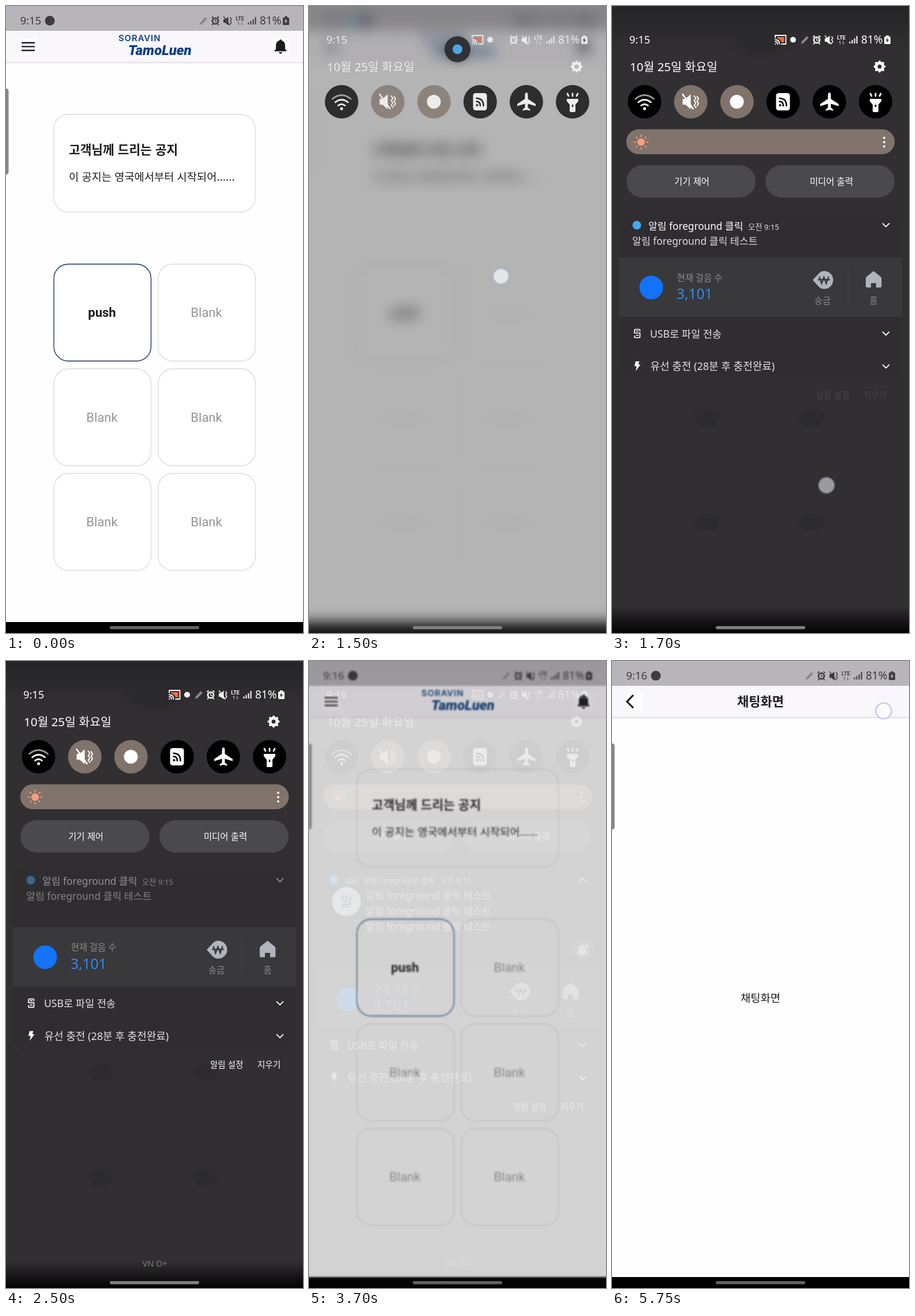
An HTML page that plays this animation: 515 px wide and 1087 px high, repeating every 5800 ms.

```html
<!DOCTYPE html>
<html lang="ko">
<head>
<meta charset="utf-8">
<title>Push notification demo</title>
<style>
html, body { margin: 0; height: 100%; overflow: hidden; background: #000; }
svg { display: block; width: 100vw; height: 100vh; }
text { font-family: "Noto Sans", "Noto Sans CJK KR", sans-serif; }
.kr { font-family: "Noto Sans CJK KR", "Noto Sans CJK", sans-serif; }
.rb { font-family: Roboto, sans-serif; }
.b { font-weight: 700; }
.mid { text-anchor: middle; }
.line { fill: none; stroke: currentColor; stroke-linecap: round; stroke-linejoin: round; }
.faint { opacity: var(--faint, 1); }
#bubble { filter: drop-shadow(0 2px 7px rgba(0,0,0,.28)); }
</style>
</head>
<body>
<svg viewBox="0 0 515 1087" preserveAspectRatio="none">
<defs>
  <g id="status">
    <path class="faint" d="M335.5 33l1.6-4.6 8.6-9.2 3.2 3.1-8.8 9z" fill="#89878b"/>
    <g class="line" stroke-width="2.6"><circle cx="363" cy="26" r="5"/><path d="M357 20.5l2-1.8M369 20.5l-2-1.8M358.7 31.5l-1 1.2M367.3 31.5l1 1.2" stroke-width="1.8"/><path d="M363 23.5v3h2" stroke-width="1.3"/></g>
    <path d="M377 23h3l5.5-4.5v15L380 29h-3z" fill="currentColor"/>
    <path d="M377.5 18.5L388 33M389 20l1.8 2.6-1.8 3 1.8 3-1.8 2.6" class="line" stroke-width="1.5"/>
    <text class="rb b" x="398.3" y="25" font-size="9" fill="currentColor">LTE</text>
    <path d="M403.5 33v-5.5l-2 2M408.5 27.5V33l2-2" class="line" stroke-width="1" opacity=".65"/>
    <path d="M419.5 28.5h2V32h-2zM423.5 26h2v6h-2zM427.6 23h2v9h-2zM431.6 19h2v13h-2z" fill="currentColor"/>
    <text x="440" y="32.3" font-size="19" fill="currentColor">81%</text>
    <path d="M483 18h5v2h1.5q1.5 0 1.5 1.5v10q0 1.5-1.5 1.5h-8q-1.5 0-1.5-1.5v-10q0-1.5 1.5-1.5H483z" fill="currentColor"/>
  </g>
  <g id="side">
    <rect x="-80" y="-80" width="675" height="123" fill="#b7b5ba"/>
    <rect x="-80" y="43" width="675" height="55" fill="#f9f7fb"/>
    <rect y="97.5" width="515" height="1.2" fill="#d2d0d5"/>
    <use href="#status" color="#3d3c40"/>
    <path d="M486 21.5l-3.5 5.5h2.4l-.7 4 4-5.6h-2.6z" fill="#b7b5ba"/>
    <path class="faint" d="M0 143q4.5 0 4.5 5v139q0 5-4.5 5z" fill="#858487"/>
    <rect x="-80" y="1068" width="675" height="100"/>
  </g>
  <linearGradient id="floor" x1="0" x2="0" y1="0" y2="1"><stop offset="0" stop-color="#000" stop-opacity="0"/><stop offset="1" stop-color="#000" stop-opacity=".95"/></linearGradient>
  <linearGradient id="roof" x1="0" x2="0" y1="0" y2="1"><stop offset="0" stop-color="#262527"/><stop offset=".35" stop-color="#28272a"/><stop offset="1" stop-color="#312f31"/></linearGradient>
  <radialGradient id="shadow"><stop offset=".4" stop-color="#2a292b"/><stop offset="1" stop-color="#2a292b" stop-opacity="0"/></radialGradient>
  <clipPath id="pillClip"><rect id="clipBox" y="58" height="46" rx="22"/></clipPath>
  <path id="bell" d="M0-12a2 2 0 0 1 2 2q6 1.5 6 8.5v6l2.5 2.7V8.500h-21V7.200L-8 4.500v-6Q-8-8.500-2-10a2 2 0 0 1 2-2zM-2.800 10h5.600a2.800 2.800 0 0 1-5.600 0z"/>
  <path id="chev" class="line" stroke-width="1.9" d="M-5.500-2.800L0 2.700 5.500-2.800"/>
</defs>

<g id="home">
  <rect x="-80" y="-80" width="675" height="1247" fill="#fefefe"/>
  <use href="#side"/>
  <text class="clock" x="24.500" y="32" font-size="18.500" fill="#3d3c40">9:15</text>
  <circle id="newIcon" cx="76.500" cy="26" r="7.500" fill="#46a9f0"/>
  <circle id="oldIcon" cx="76" cy="25.500" r="8.500" fill="#3d3c40"/>
  <rect x="24" y="56" width="30" height="29" fill="#fff"/>
  <path d="M27 63.700h23M27 70.400h23M27 77h23" stroke="#1c1b1f" stroke-width="2.400"/>
  <text x="195" y="60.500" font-size="14.800" font-weight="600" letter-spacing="1" fill="#0d3f80" style="font-family:Inter,sans-serif">SORAVIN</text>
  <text class="rb" x="212" y="84.800" font-size="24" font-weight="900" font-style="italic" fill="#0d3f80">TamoLuen</text>
  <rect x="461" y="56" width="30" height="29" fill="#fff"/>
  <use href="#bell" x="476" y="70" fill="#1c1b1f"/>
  <rect class="faint" x="82.800" y="188" width="349.500" height="169" rx="25" fill="#fff" stroke="#dbdadd" stroke-width="1.300"/>
  <text class="kr b" x="109" y="256.500" font-size="21.400" fill="#1c1b1f">고객님께 드리는 공지</text>
  <text class="kr" x="109" y="303" font-size="18.700" fill="#1c1b1f">이 공지는 영국에서부터 시작되어......</text>
  <g id="tiles"></g>
  <circle id="ripple" cx="167" cy="531" fill="#1c1b1f"/>
</g>

<rect id="dim" width="515" height="1087" fill="#312f31"/>

<g id="bubble">
  <rect id="pill" fill="#242326"/>
  <circle id="pillIcon" r="8.500" fill="#46a9f0"/>
  <g id="pillText" clip-path="url(#pillClip)" fill="#fff">
    <text x="80" y="87" font-size="16.800" font-weight="600">알림 foreground...</text>
    <text x="247" y="87" font-size="17.300">알림 foreground 클릭 테스트</text>
  </g>
</g>

<g id="shade" color="#fff">
  <g id="backdrop">
    <rect width="515" height="1087" fill="#312f31"/>
    <rect width="515" height="75" fill="url(#roof)"/>
    <ellipse cx="257" cy="62" rx="62" ry="36" fill="url(#shadow)"/>
    <g fill="#2c2b2d"><rect x="143" y="698" width="44" height="30" rx="15"/><rect x="324" y="698" width="44" height="30" rx="15"/><rect x="143" y="880" width="44" height="30" rx="15"/><rect x="324" y="880" width="44" height="30" rx="15"/></g>
    <rect y="1040" width="515" height="47" fill="url(#floor)"/>
  </g>
  <g id="top">
    <text class="clock" x="30" y="65.300" font-size="18.300" fill="#fff">9:15</text>
    <use id="shadeStatus" href="#status" x="-8" y="33"/>
    <path d="M478 54.500l-3.500 5.500h2.400l-.7 4 4-5.600h-2.600z" fill="#312f31"/>
    <g class="line" stroke-width="1.800"><path d="M283 55v-4h18.500v15H294M283 66h.5M283 62q4 0 4 4M283 58.500q7.500 0 7.500 7.500"/></g>
    <path d="M286 54h12.500v9H294q-2-6-8-7z" fill="#f06a3c"/>
    <circle cx="314" cy="58.500" r="5" fill="#fff"/>
    <text x="31" y="112.800" font-size="20.500" fill="#fff">10월 25일 화요일</text>
    <g id="gear" transform="translate(464 105)"><circle r="6" fill="none" stroke="#fff" stroke-width="5"/></g>
    <g id="quick"></g>
    <g transform="translate(56.500 166)" class="line" stroke-width="2.700"><path d="M-16-5Q0-18 16-5" opacity=".6"/><path d="M-11 1Q0-8 11 1M-6 6.500Q0 2 6 6.500"/><circle cy="12" r="1.200"/></g>
    <g transform="translate(136.500 166)"><path d="M-14-5h5L0-13v26L-9 5h-5z" fill="#fff"/><path d="M-14-13L4 12" class="line" stroke-width="2.600"/><path d="M6-10l3 4-3 4 3 4-3 4 3 4M11-9l2.500 4-2.500 4 2.500 4-2.500 4" class="line" stroke-width="2"/></g>
    <circle cx="216.500" cy="166" r="12" fill="#fff"/>
    <g transform="translate(296.500 166)"><rect x="-12" y="-15" width="24" height="30" rx="4.500" fill="#fff"/><g fill="none" stroke="#000" stroke-width="2.600" stroke-linecap="round"><path d="M-6-6Q6-6 6 7M-6-.5Q.5-.5.5 7"/><circle cx="-5" cy="6" r=".8"/></g></g>
    <path transform="translate(377 166)" d="M0-16q2.500 0 2.500 5v6L16 4v3.500L2.500 3.500V10l4 3.500v2L0 14l-6.500 1.500v-2l4-3.500V3.500L-16 7.500V4L-2.500-5v-6q0-5 2.500-5z" fill="#fff"/>
    <g transform="translate(457 166)"><path d="M-10-5h20v4L5 5v11q0 2-2 2h-6q-2 0-2-2V5l-5-6z" fill="#fff"/><path d="M0-10v-4M-7-10l-2-4M7-10l2-4" class="line" stroke-width="2.800"/><path d="M0 5v4" stroke="#000" stroke-width="2.500"/></g>
  </g>
  <g id="slider">
    <rect x="25.200" y="214.200" width="464.600" height="42.300" rx="21" fill="#80736b" stroke="#8a7e76" stroke-width=".8"/>
    <g id="sun" transform="translate(50.500 236)"><circle r="6.500" fill="#f79d7d"/></g>
    <g fill="#fff"><circle cx="472" cy="228.500" r="2"/><circle cx="472" cy="236" r="2"/><circle cx="472" cy="243.500" r="2"/></g>
  </g>
  <g id="body">
    <g fill="#4a494c"><rect x="25" y="276" width="224" height="56" rx="28"/><rect x="266" y="276" width="224" height="56" rx="28"/></g>
    <g class="mid" fill="#fff" font-size="15.400" font-weight="500"><text class="kr" x="138.500" y="310">기기 제어</text><text class="kr" x="380.500" y="310">미디어 출력</text></g>
    <rect id="card" x="12" y="356" width="491" rx="26" fill="#2f2d2f"/>
    <g id="small" fill="#fff">
      <circle cx="43" cy="380" r="7.500" fill="#46a9f0"/>
      <text x="63" y="388" font-size="17.200">알림 foreground 클릭</text>
      <text x="236" y="388" font-size="13.200" fill="#dedde0">오전 9:15</text>
      <text x="35" y="414" font-size="17.300" fill="#dedde0">알림 foreground 클릭 테스트</text>
      <use href="#chev" x="475" y="380"/>
    </g>
    <g id="large" fill="#e4e3e6">
      <circle cx="43" cy="379" r="7.500" fill="#46a9f0"/>
      <g font-size="13"><text x="62" y="384.500">app</text><text x="94" y="384.500">알림 foreground 클릭</text><text x="228" y="384.500">오전 9:15</text></g>
      <use href="#chev" transform="translate(474.500 379) scale(1 -1)"/>
      <circle cx="65" cy="417" r="25" fill="#dce1fb"/>
      <text class="kr mid" x="65" y="425" font-size="23" fill="#1c1b1f">알</text>
      <g font-size="17.300" id="lines"></g>
      <circle cx="475" cy="500" r="17.500" fill="#49484a"/>
      <use href="#bell" transform="translate(474 501) scale(.82)" fill="#dddce0"/>
      <circle cx="481" cy="495" r="4" fill="#dddce0" stroke="#49484a" stroke-width="1.500"/>
    </g>
    <g id="low">
      <rect x="12" y="436" width="491" height="103" fill="#39383a"/>
      <circle cx="68" cy="488" r="20.500" fill="#1473fb"/>
      <text x="112.500" y="476.500" font-size="15.400" fill="#8c8b8f">현재 걸음 수</text>
      <text x="112" y="508.300" font-size="24.500" fill="#318af5">3,101</text>
      <path d="M348 475l9.500-10q4-5.500 10.500-5.500a15.500 15.500 0 0 1 0 31q-6.500 0-10.500-5z" fill="#b1b4ba"/>
      <path d="M359.500 469l4 12 4-11 4 11 4-12M357 474.500h21" fill="none" stroke="#39383a" stroke-width="2.300"/>
      <path d="M409.500 456v62" stroke="#444346"/>
      <path d="M453.500 459.500l12 9.500q1.800 1.500 1.800 3.500v13q0 2.500-2.500 2.500H458v-7.500h-9v7.500h-6.500q-2.500 0-2.500-2.500v-13q0-2 1.800-3.500z" fill="#b1b4ba"/>
      <g class="mid" font-size="15.300" fill="#8c8b8f"><text class="kr" x="365" y="516">송금</text><text class="kr" x="453.500" y="516">홈</text></g>
      <path d="M39 566v-3.500q0-2 2-2h5.500q2 0 2 2v1M39 567h9.500v6q0 2-2 2H41q-2 0-2-2v-1M42 563.500h3.500M42 571h3.500" class="line" stroke-width="1.700"/>
      <text x="66" y="574.800" font-size="17.600" fill="#e4e3e6">USB로 파일 전송</text>
      <use href="#chev" x="475" y="568"/>
      <path d="M41 616h6.500l-2 5.500h4L41 633l1.800-8.500h-4z" fill="#fff"/>
      <text x="66.500" y="631.300" font-size="18" fill="#e4e3e6">유선 충전 (28분 후 충전완료)</text>
      <use href="#chev" x="475" y="625"/>
      <g id="links" fill="#fff" font-size="14.500" font-weight="500"><text class="kr" x="354" y="679.500">알림 설정</text><text class="kr" x="436" y="679.500">지우기</text></g>
    </g>
    <text id="carrier" class="mid" x="258" y="1050" font-size="14.500" fill="#7d7c80">VN O+</text>
  </g>
</g>

<g id="chat">
  <rect width="515" height="1087" fill="#fefefe"/>
  <use href="#side"/>
  <text x="24.500" y="32" font-size="18.500" fill="#3d3c40">9:16</text>
  <circle cx="76" cy="25.500" r="8.500" fill="#3d3c40"/>
  <rect x="24" y="56" width="30" height="29" fill="#fff"/>
  <path d="M37 59L26 70.300 37 81.500" fill="none" stroke="#1c1b1f" stroke-width="3.100"/>
  <text class="kr b mid" x="257.500" y="78.300" font-size="22" fill="#1c1b1f">채팅화면</text>
  <text class="kr mid" x="257.500" y="590.500" font-size="18.700" fill="#1c1b1f">채팅화면</text>
</g>

<rect id="navPill" x="180" y="1075" width="155" height="5.500" rx="2.700"/>
<g id="touch"><circle r="15.500" fill="#8fa3dd" opacity=".22"/><circle r="13.300" fill="#fff" opacity=".88" stroke="#bcc6e8" stroke-width="1.800"/></g>
</svg>
<script>
const LOOP = 5800, STEP = 50;
const $ = id => document.getElementById(id);
const set = (id, attrs) => { for (const k in attrs) $(id).setAttribute(k, attrs[k]); };
const ramp = (t, a, b) => Math.min(1, Math.max(0, (t - a) / (b - a)));
const out = p => 1 - (1 - p) ** 3;
const soft = p => p * p * (3 - 2 * p);
const mix = (a, b, p) => a + (b - a) * p;
const show = (id, o) => {
  $(id).style.opacity = o;
  $(id).style.display = o > 0 ? '' : 'none';
};

function build() {
  let s = '';
  for (let i = 0; i < 6; i++) {
    const x = 83 + i % 2 * 181, y = 447.5 + (i >> 1) * 181.5;
    s += `<rect class="faint" x="${x}" y="${y}" width="168.500" height="168" rx="25" fill="#fff" stroke="${i ? '#dbdadd' : '#0c2d5e'}" stroke-width="1.300"/>
      <text class="rb mid ${i ? 'faint' : 'b'}" x="${x + 83.5}" y="${y + 91.5}" font-size="22" fill="${i ? '#969598' : '#1c1b1f'}">${i ? 'Blank' : 'push'}</text>`;
  }
  $('tiles').innerHTML = s;
  $('quick').innerHTML = [0, 1, 2, 3, 4, 5].map(i =>
    `<circle cx="${56.5 + i * 80.1}" cy="166" r="29" fill="${i == 1 || i == 2 ? '#80736b' : '#000'}"/>`).join('');
  $('lines').innerHTML = [413, 440, 467].map(y =>
    `<text x="98" y="${y}">알림 foreground 클릭 테스트</text>`).join('');
  const rays = (r1, r2, w, c) => [0, 1, 2, 3, 4, 5, 6, 7].map(i =>
    `<path d="M0 ${r1}V${r2}" transform="rotate(${i * 45})" stroke="${c}" stroke-width="${w}" stroke-linecap="round"/>`).join('');
  $('sun').innerHTML += rays(10, 12, 2, '#f79d7d');
  $('gear').innerHTML += rays(7, 8.5, 4, '#fff');
}

// taps: start, end, x, y
const taps = [[50, 550, 167, 545], [2400, 2500, 472, 383], [3450, 3550, 250, 425], [5250, 5500, 466, 57.5], [5750, 5800, 471, 86.5]];

function drawTouch(t) {
  let x = 0, y = 0, o = 0;
  for (const [a, b, tx, ty] of taps)
    if (t >= a && t < b) { x = tx; y = ty; o = 1 - ramp(t, b - 100, b) * (b - a > 100 ? .6 : 0); }
  if (t >= 1250 && t < 1800) {
    const late = t > 1600;
    const p = late ? ramp(t, 1600, 1700) : ramp(t, 1250, 1600);
    x = late ? mix(346, 372, p) : mix(300, 346, p);
    y = late ? mix(644, 831, p) : mix(30, 644, p);
    o = .75 - .17 * ramp(t, 1600, 1700) - .58 * ramp(t, 1700, 1800);
  }
  show('touch', o);
  set('touch', { transform: `translate(${x} ${y})` });
}

function drawBubble(t) {
  const on = t >= 500 && t < 1700;
  show('bubble', on ? ramp(t, 450, 600) * (1 - .25 * ramp(t, 1400, 1600) - .75 * ramp(t, 1600, 1700)) : 0);
  if (!on) return;
  const drop = out(ramp(t, 500, 700));
  const shrink = soft(ramp(t, 1100, 1400));
  const grow = soft(ramp(t, 700, 900)) * (1 - shrink);
  const over = 8 * Math.sin(Math.PI * ramp(t, 850, 1050));
  const w = mix(45, 447 + over, grow);
  const cy = mix(mix(28, 75, drop), 80.5, grow);
  const x = 257.5 - w / 2;
  set('pill', { x, y: cy - 22.5, width: w, height: 45, rx: 22.5 });
  set('clipBox', { x, width: w });
  set('pillIcon', { cx: mix(257.5, x + 23, grow), cy });
  show('pillText', ramp(t, 800, 1000) * (1 - ramp(t, 1100, 1250)));
}

function drawShade(t) {
  const close = soft(ramp(t, 3500, 3750));
  const live = t > 1250 && t < 3750;
  show('shade', live ? 1 - close : 0);
  show('backdrop', ramp(t, 1650, 1700));
  show('top', ramp(t, 1350, 1550));
  const q = ramp(t, 1500, 1700);
  show('slider', q);
  set('slider', { transform: `translate(0 ${-10 * (1 - q)})` });
  show('body', ramp(t, 1625, 1700));
  $('shadeStatus').style.setProperty('--faint', ramp(t, 1600, 1700));
  const e = soft(ramp(t, 2375, 2750));
  set('low', { transform: `translate(0 ${98 * e})` });
  set('card', { height: 295 + 98 * e });
  show('small', 1 - ramp(e, 0, .5));
  show('large', ramp(e, .4, 1));
  show('links', mix(.1, 1, ramp(t, 1700, 1850)));
  show('carrier', ramp(t, 1700, 1900));

  const dim = (t <= 1600 ? .48 * ramp(t, 1200, 1600) : mix(.48, 1, ramp(t, 1600, 1700))) * (1 - close);
  show('dim', dim);
  const haze = ramp(t, 1250, 1550) * (1 - close);
  const home = $('home').style;
  home.filter = haze > .01 ? `blur(${14 * haze}px)` : 'none';
  home.setProperty('--faint', 1 - haze);
  set('navPill', { fill: live && close < .5 ? '#7f7e81' : '#626164' });
}

function draw(t) {
  const posted = t >= 550 && t < 3500;
  show('newIcon', posted ? 1 : 0);
  set('oldIcon', { cx: posted ? 98.5 : 76 });
  for (const c of document.querySelectorAll('.clock')) c.textContent = t < 2900 ? '9:15' : '9:16';
  show('ripple', t >= 50 ? .07 * (1 - ramp(t, 500, 750)) : 0);
  set('ripple', { r: mix(20, 80, out(ramp(t, 0, 250))) });
  drawBubble(t);
  drawShade(t);
  const enter = soft(ramp(t, 3700, 3950));
  show('chat', enter);
  set('chat', { transform: `translate(0 ${30 * (1 - enter)})` });
  drawTouch(t);
}

build();
const start = performance.now();
function tick() {
  const t = (performance.now() - start) % LOOP;
  draw(Math.floor(t / STEP) * STEP);
  requestAnimationFrame(tick);
}
tick();
</script>
</body>
</html>
```
